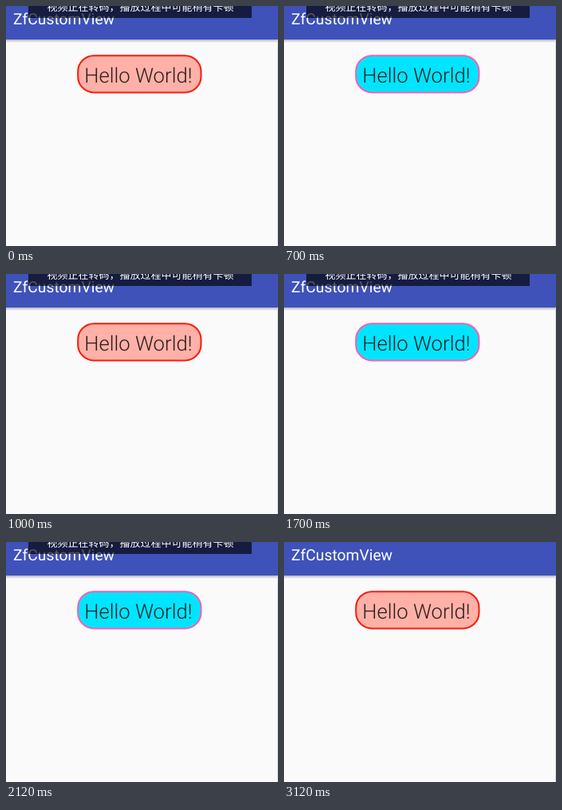
Recreate the animation shown at these times as an HTML page. Size 341x301 px, loop 3.6 s.

```html
<!DOCTYPE html>
<html lang="zh">
<head>
<meta charset="utf-8">
<title>Custom view</title>
<style>
  html, body { margin: 0; width: 100%; height: 100%; overflow: hidden; background: #fafafa; }
  svg { display: block; width: 341px; height: 301px; }
  text { font-family: Roboto, sans-serif; text-rendering: geometricPrecision; }
  #label { font-weight: 350; }
  #notice text { font-family: "Noto Sans CJK SC", "Noto Sans CJK", sans-serif; }
</style>
</head>
<body>
<svg viewBox="0 0 341 301">
  <defs>
    <linearGradient id="shade" x2="0" y2="1">
      <stop stop-color="#b4b5bb"/>
      <stop offset="1" stop-color="#fafafa"/>
    </linearGradient>
  </defs>
  <rect width="341" height="301" fill="#fafafa"/>
  <rect y="42" width="341" height="4" fill="url(#shade)"/>
  <rect x="340" y="42" width="1" height="259" fill="#d9d9d9"/>
  <rect width="341" height="42" fill="#3f52b9"/>
  <text x="9" y="22.6" font-size="19.3" fill="#fff">ZfCustomView</text>

  <g id="notice">
    <rect x="28" width="280" height="15" fill="#000" fill-opacity=".66"/>
    <text x="51.5" y="5.5" font-size="13" fill="#fff">视频正在转码，播放过程中可能稍有卡顿</text>
  </g>

  <rect id="pill" x="90.2" y="62.2" width="154.3" height="46.2" rx="20" stroke-width="2"/>
  <text id="label" x="98.3" y="95.5" font-size="25.7">Hello World!</text>
</svg>
<script>
  const LOOP = 3600;
  const rose = { fill: '#ffb1a8', stroke: '#f81c0a' };
  const cyan = { fill: '#00e5ff', stroke: '#f65fb4' };
  const darkRed = { fill: '#2b1e1d' };
  const darkCyan = { fill: '#0d2529' };

  // Each step is [start in ms, style], held until the next one.
  function play(id, steps) {
    const frames = steps.map(([at, style]) => ({ ...style, offset: at / LOOP, easing: 'step-end' }));
    frames.push({ ...steps[steps.length - 1][1], offset: 1 });
    const anim = document.getElementById(id).animate(frames, { duration: LOOP, iterations: Infinity });
    anim.startTime = 0;
  }

  const toggle = (a, b) => [[0, a], [400, b], [1000, a], [1700, b], [2400, a]];
  play('pill', toggle(rose, cyan));
  play('label', toggle(darkRed, darkCyan));
  play('notice', [[0, { opacity: 1 }], [2400, { opacity: 0 }]]);
</script>
</body>
</html>
```
